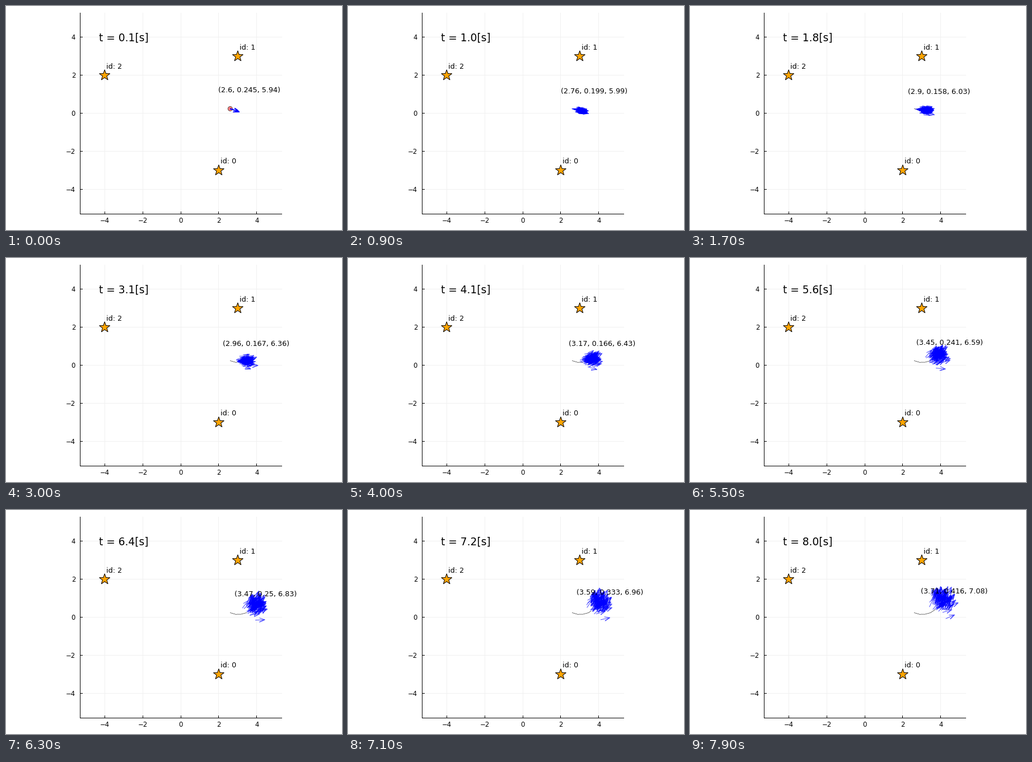
Recreate the animation shown at these times as a matplotlib script. Size 600 by 400 pixels, loop 8000 ms.

```python
import numpy as np
import matplotlib.pyplot as plt
from matplotlib.animation import FuncAnimation
from matplotlib.collections import LineCollection
from matplotlib.patches import Circle, Polygon

W, H, DPI = 600, 400, 100
PT = 72 / DPI
SCALE = 33.96
STEPS, DT = 80, 0.1
NU, OMEGA = 0.2, np.radians(10)

# Key poses of the robot: time, x, y, heading
POSES = np.array([
    (0.1, 2.60, 0.245, 5.94),
    (1.8, 2.90, 0.158, 6.03),
    (3.1, 2.96, 0.167, 6.36),
    (4.1, 3.17, 0.166, 6.43),
    (5.6, 3.45, 0.241, 6.59),
    (6.4, 3.47, 0.250, 6.83),
    (8.0, 3.71, 0.416, 7.08),
])

plt.rcParams["font.family"] = "DejaVu Sans"
fig = plt.figure(figsize=(W / DPI, H / DPI), dpi=DPI, facecolor="white")
ax = fig.add_axes([0, 0, 1, 1])
ax.set_xlim(0, W)
ax.set_ylim(H, 0)
ax.axis("off")


def to_px(x, y):
    return 312 + SCALE * np.asarray(x), 191.75 - SCALE * np.asarray(y)


def line(x0, y0, x1, y1, color="black", z=1):
    """Straight line on the pixels that contain its end points."""
    ax.plot([x0 - 0.5, x1 - 0.5], [y0 - 0.5, y1 - 0.5], color=color, lw=PT,
            zorder=z)


def label(x, y, text, size, ha="center"):
    """Text whose digits are vertically centred on y (pixels)."""
    return ax.text(x, y + 0.365 * size, text, fontsize=size * PT, ha=ha,
                   va="baseline", zorder=10)


def draw_axes(left=132.5, right=492, top=12, bottom=371.5):
    for v in range(-4, 5, 2):
        x, y = to_px(v, v)
        name = str(v).replace("-", "\u2212")
        line(x, top, x, bottom, "#f0f0f0", z=0)
        line(left, y, right, y, "#f0f0f0", z=0)
        line(x, bottom, x, bottom - 4)
        line(left, y, left + 4, y)
        label(x, 383, name, 11.6)
        label(124, y, name, 11.6, ha="right")
    line(left, top, left, bottom)
    line(left, bottom, right, bottom)


def draw_star(x, y, name):
    cx, cy = to_px(x, y)
    k = np.arange(10)
    a, r = k * np.pi / 5, np.where(k % 2, 4, 10)
    pts = np.column_stack([cx + r * np.sin(a), cy - r * np.cos(a)])
    ax.add_patch(Polygon(pts, fc="orange", ec="black", lw=PT, zorder=3))
    label(*to_px(x + 0.5, y + 0.5), name, 12.8)


def particle_paths(x0, y0, heading, count=100):
    """Noisy velocity motion model; arrays are (step, particle)."""
    rng = np.random.default_rng(4)

    def noisy(mean, sd):
        noise = rng.standard_normal((STEPS - 1, count))
        noise -= noise.mean(axis=1, keepdims=True)
        return mean + sd * noise

    def accumulate(first, rate):
        return first + np.vstack([np.zeros(count), np.cumsum(rate * DT, axis=0)])

    nu = noisy(NU, 0.19 * np.sqrt(NU / DT))
    omega = noisy(OMEGA, np.hypot(0.13 * np.sqrt(NU / DT),
                                  0.2 * np.sqrt(OMEGA / DT)))
    # One straggler turns late and drifts below the cloud
    nu[:, 0] = 1.1 * NU
    omega[:, 0] = OMEGA * np.linspace(-0.4, 1.5, STEPS - 1)

    theta = accumulate(heading, omega)
    mid = (theta[1:] + theta[:-1]) / 2
    return (accumulate(x0, nu * np.cos(mid)),
            accumulate(y0, nu * np.sin(mid)), theta)


def arrows(x, y, theta, length=0.5, barb=10, spread=np.radians(21)):
    tail = to_px(x, y)
    head = to_px(x + length * np.cos(theta), y + length * np.sin(theta))

    def back(a):
        return (head[0] - barb * np.cos(theta + a),
                head[1] + barb * np.sin(theta + a))

    pts = [tail, head, back(spread), head, back(-spread)]
    return np.transpose(np.array(pts), (2, 0, 1))


times = DT * np.arange(1, STEPS + 1)
rx, ry, rth = (np.interp(times, POSES[:, 0], col) for col in POSES.T[1:])
px, py, pth = particle_paths(*POSES[0, 1:])

draw_axes()
for i, (sx, sy) in enumerate([(2, -3), (3, 3), (-4, 2)]):
    draw_star(sx, sy, f"id: {i}")

trail, = ax.plot([], [], color="black", lw=0.55 * PT, zorder=4)
body = Circle(to_px(rx[0], ry[0]), 4, fc=(1, 0, 0, 0.5), ec=(0, 0, 0, 0.6),
              lw=PT, zorder=4)
ax.add_patch(body)
cloud = LineCollection([], colors=[(0, 0, 1, 0.7)], linewidths=PT, zorder=5,
                       joinstyle="round")
ax.add_collection(cloud, autolim=False)
clock = label(*to_px(-3, 4), "", 18.6)
pose = label(0, 0, "", 12.7)


def update(i):
    trail.set_data(*to_px(rx[:i + 1], ry[:i + 1]))
    body.set_visible(i == 0)
    cloud.set_segments(arrows(px[i], py[i], pth[i]))
    clock.set_text(f"t = {times[i]:.1f}[s]")
    cx, cy = to_px(rx[i] + 1, ry[i] + 1)
    pose.set_position((cx, cy + 5))
    pose.set_text(f"({rx[i]:.3g}, {ry[i]:.3g}, {rth[i]:.3g})")
    return trail, body, cloud, clock, pose


anim = FuncAnimation(fig, update, frames=STEPS, interval=100, repeat=True,
                     repeat_delay=0, blit=False)
plt.show()
```
